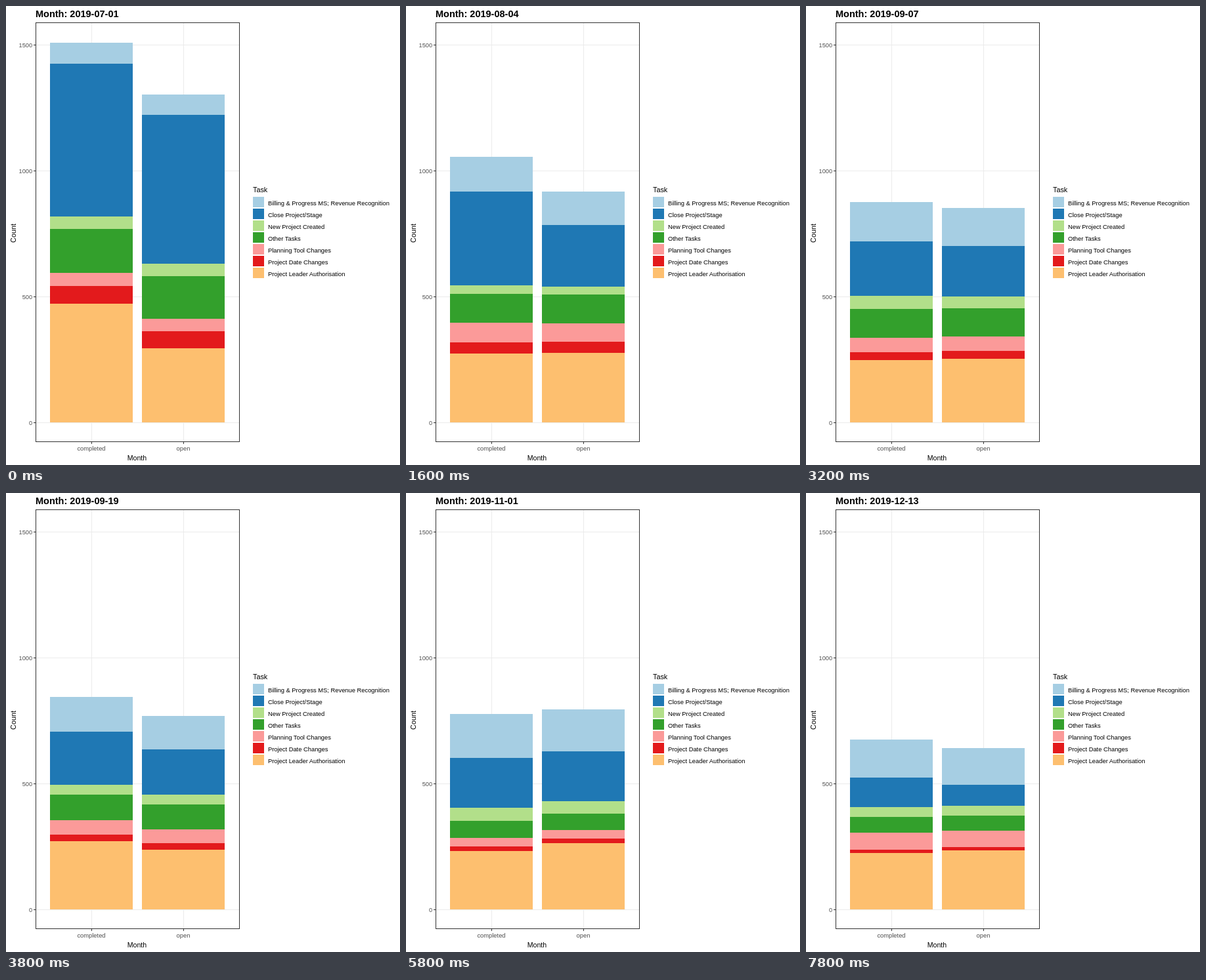
An HTML page for the animation above (8 s loop, 600 by 700 pixels).

```html
<!DOCTYPE html>
<html lang="en">
<head>
<meta charset="utf-8">
<title>Tasks by month</title>
<style>
  html, body { margin: 0; width: 100%; height: 100%; overflow: hidden; background: #fff; }
  svg { display: block; width: 600px; height: 700px; font-family: "Liberation Sans", Arial, sans-serif; }
  rect { shape-rendering: crispEdges; }
</style>
</head>
<body>
<svg id="chart" viewBox="0 0 600 700"></svg>
<script>
const chart = document.getElementById('chart');
const STEP = 200, LOOP = 8000, DAYS_PER_STEP = 4.2525, DAY = 86400000;
const BASE = 635, PX_PER_COUNT = 0.384, OPEN_SHARE = 0.97;

const monthStart = month => Date.UTC(2019, 6 + month, 1);
const monthStep = month => Math.round((monthStart(month) - monthStart(0)) / DAY / DAYS_PER_STEP);

const points = (...counts) => month => counts[month];
const decay = (floor, extra, rate) => month => floor + extra * rate ** month;
const zigzag = (mean, swing) => month => mean + swing * (-1) ** month;

// Monthly counts by task; open tasks are a fixed share of completed ones unless given.
const tasks = [
  { name: 'Billing & Progress MS; Revenue Recognition', color: '#A6CEE3',
    completed: points(85, 137, 155, 128, 173, 151, 148) },
  { name: 'Close Project/Stage', color: '#1F78B4',
    completed: points(605, 373, 218, 209, 198, 114, 127),
    open: points(590, 244, 200, 173, 196, 75, 107) },
  { name: 'New Project Created', color: '#B2DF8A', completed: zigzag(42, 9) },
  { name: 'Other Tasks', color: '#33A02C',
    completed: points(175, 117, 114, 96, 68, 57, 72) },
  { name: 'Planning Tool Changes', color: '#FB9A99',
    completed: points(52, 76, 59, 57, 36, 73, 53) },
  { name: 'Project Date Changes', color: '#E31A1C', completed: decay(10, 60, 0.6) },
  { name: 'Project Leader Authorisation', color: '#FDBF6F',
    completed: points(471, 273, 246, 282, 231, 218, 237),
    open: points(293, 276, 254, 230, 263, 214, 279) }
];
for (const task of tasks) {
  task.open ??= month => OPEN_SHARE * task.completed(month);
}

function add(tag, attrs, text) {
  const el = document.createElementNS('http://www.w3.org/2000/svg', tag);
  for (const name in attrs) el.setAttribute(name, attrs[name]);
  if (text) el.textContent = text;
  return chart.appendChild(el);
}
const box = (x, y, width, height, fill) => add('rect', { x, y, width, height, fill });
const label = (x, y, size, text, more) => add('text', { x, y, 'font-size': size, ...more }, text);

const middle = { 'text-anchor': 'middle' };
const axisText = { fill: '#4D4D4D' };

for (let count = 0; count <= 1500; count += 500) {
  const y = BASE - count * PX_PER_COUNT;
  box(46, y, 309, 1, '#EBEBEB');
  box(42, y, 3, 1, '#333');
  label(40, y + 4, 9.2, String(count), { ...axisText, 'text-anchor': 'end' });
}

const bars = ['completed', 'open'].map((state, i) => {
  const x = 130 + 140 * i;
  box(x, 26, 1, 638, '#EBEBEB');
  box(x, 665, 1, 3, '#333');
  label(x, 678, 9.35, state, { ...axisText, ...middle });
  return { state, rects: tasks.map(task => box(x - 63, 0, 126, 0, task.color)) };
});

for (const y of [25, 664]) box(45, y, 311, 1, '#333');
for (const x of [45, 355]) box(x, 25, 1, 640, '#333');

const title = label(45, 17, 14.5, ' ', { 'font-weight': 'bold' });
label(199.5, 693, 10.6, 'Month', middle);
label(0, 0, 10.8, 'Count', { ...middle, transform: 'translate(15 346.5) rotate(-90)' });
label(376, 284, 10.8, 'Task');
tasks.forEach(({ name, color }, i) => {
  box(376, 291 + 18 * i, 17, 16, color);
  label(399, 304 + 18 * i, 9.35, name);
});

const cubicInOut = t => t < 0.5 ? 4 * t ** 3 : 1 - 4 * (1 - t) ** 3;

function draw(step) {
  const date = new Date(monthStart(0) + Math.floor(step * DAYS_PER_STEP) * DAY);
  title.textContent = 'Month: ' + date.toISOString().slice(0, 10);

  let month = 0;
  while (monthStep(month + 1) <= step) month++;
  const from = monthStep(month);
  const mix = cubicInOut((step - from) / (monthStep(month + 1) - from));

  for (const { state, rects } of bars) {
    let total = 0, bottom = BASE;
    for (let i = tasks.length - 1; i >= 0; i--) {
      const count = tasks[i][state];
      total += count(month) + (count(month + 1) - count(month)) * mix;
      const top = Math.round(BASE - total * PX_PER_COUNT);
      rects[i].setAttribute('y', top);
      rects[i].setAttribute('height', bottom - top);
      bottom = top;
    }
  }
}

const origin = performance.now();
function tick() {
  const time = Math.max(0, performance.now() - origin) % LOOP;
  draw(Math.floor(time / STEP));
  requestAnimationFrame(tick);
}
tick();
</script>
</body>
</html>
```
